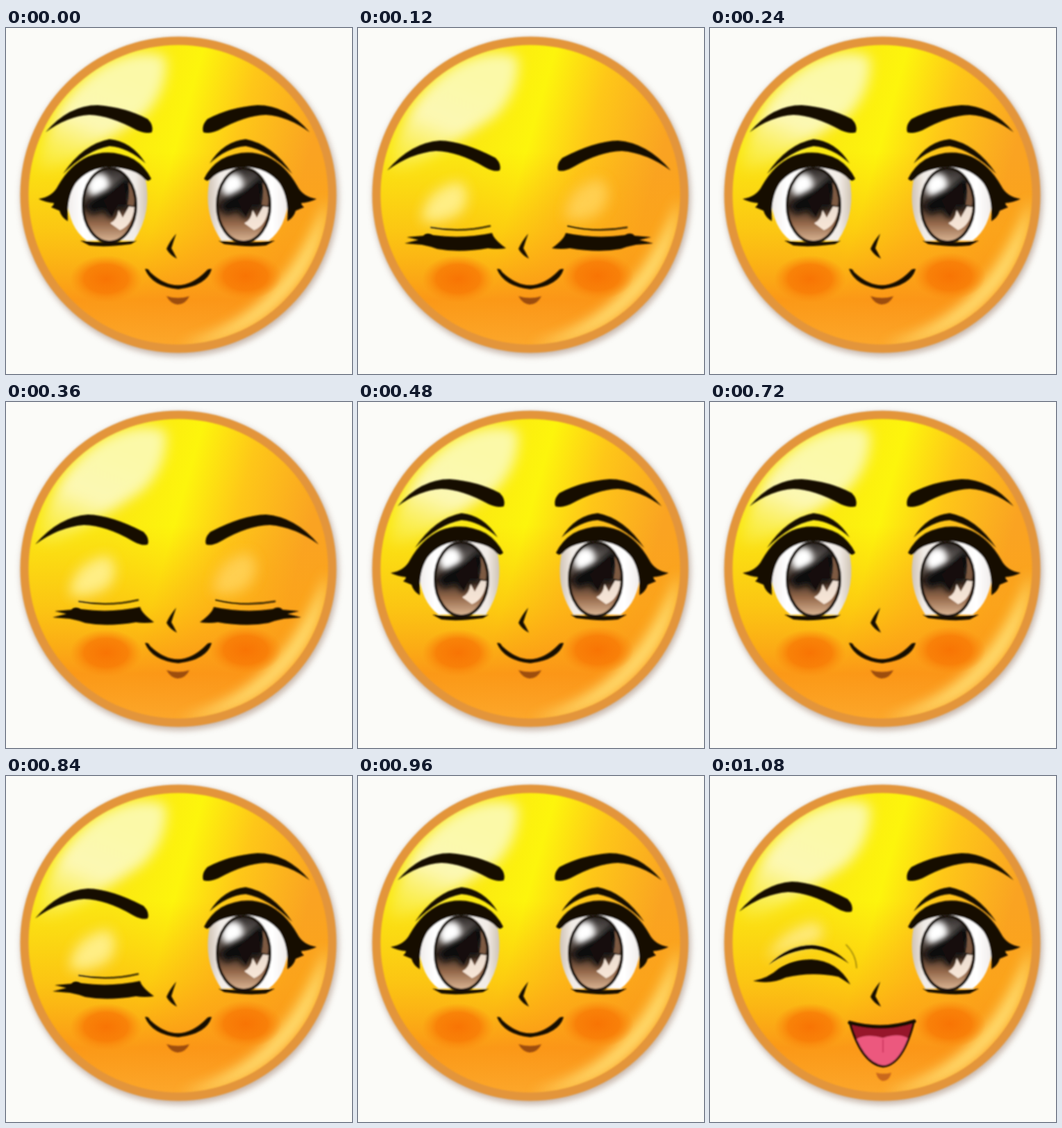
These frames come from a looping animation (498x498 px, 1200 ms). An HTML page:

```html
<!DOCTYPE html>
<html lang="en">
<head>
<meta charset="utf-8">
<title>Winking face</title>
<style>
html, body { margin: 0; width: 100%; height: 100%; overflow: hidden; background: #fbfbf8; }
svg { display: block; width: 100vw; height: 100vh; }
.ink { fill: #140b06; }
.line { fill: none; stroke: #140b06; stroke-linecap: round; }
</style>
</head>
<body>
<svg viewBox="0 0 498 498">
<defs>
  <linearGradient id="skin" gradientUnits="userSpaceOnUse" x1="165" y1="150" x2="425" y2="225">
    <stop offset="0" stop-color="#fbe812"/><stop offset=".3" stop-color="#fdf50c"/>
    <stop offset=".6" stop-color="#fec718"/><stop offset="1" stop-color="#faa322"/>
  </linearGradient>
  <linearGradient id="low" x2="0" y2="1">
    <stop offset=".36" stop-color="#fca414" stop-opacity="0"/>
    <stop offset=".62" stop-color="#fca414" stop-opacity=".5"/>
    <stop offset=".84" stop-color="#fb9417" stop-opacity=".95"/>
    <stop offset="1" stop-color="#fca82c"/>
  </linearGradient>
  <linearGradient id="shine" gradientUnits="userSpaceOnUse" x1="150" y1="65" x2="80" y2="225">
    <stop offset="0" stop-color="#fbf9a8"/><stop offset=".45" stop-color="#fcf8b4"/>
    <stop offset="1" stop-color="#f9ef60" stop-opacity=".2"/>
  </linearGradient>
  <radialGradient id="blush">
    <stop offset="0" stop-color="#f87404"/><stop offset=".6" stop-color="#f87b06" stop-opacity=".85"/>
    <stop offset="1" stop-color="#fa8a0e" stop-opacity="0"/>
  </radialGradient>
  <linearGradient id="iris" x2="0" y2="1">
    <stop offset="0" stop-color="#2c2725"/><stop offset=".25" stop-color="#6f6966"/>
    <stop offset=".52" stop-color="#3d2d24"/><stop offset=".75" stop-color="#94684a"/>
    <stop offset="1" stop-color="#dcb796"/>
  </linearGradient>
  <linearGradient id="white">
    <stop offset="0" stop-color="#efebe9"/><stop offset=".2" stop-color="#fff"/>
    <stop offset=".85" stop-color="#f1ebe6"/><stop offset="1" stop-color="#cfc3b4"/>
  </linearGradient>
  <filter id="crisp"><feGaussianBlur stdDeviation="1"/></filter>
  <filter id="soft" x="-50%" y="-50%" width="200%" height="200%"><feGaussianBlur stdDeviation="4"/></filter>
  <filter id="wide" x="-50%" y="-50%" width="200%" height="200%"><feGaussianBlur stdDeviation="9"/></filter>
  <clipPath id="disc"><circle cx="248" cy="240" r="221"/></clipPath>
  <clipPath id="irisClip"><ellipse cx="149" cy="255" rx="37" ry="52"/></clipPath>
  <clipPath id="mouthClip"><path d="M201 354Q248 370 294 352Q278 416 249 418Q218 414 201 354Z"/></clipPath>

  <path id="browUp" class="ink" d="M57 150Q90 111 132 111Q172 114 204 131Q213 140 210 150Q202 153 188 147Q150 126 120 125Q88 127 57 150Z"/>
  <path id="browDown" class="ink" d="M42 205Q76 165 118 162Q152 163 198 187Q207 196 204 205Q196 208 182 200Q145 178 112 177Q76 180 42 205Z"/>

  <g id="ball">
    <ellipse cx="149" cy="255" rx="38" ry="53" fill="url(#iris)"/>
    <g clip-path="url(#irisClip)">
      <ellipse cx="133" cy="226" rx="15" ry="17" fill="#fff" filter="url(#soft)" transform="rotate(25 133 226)"/>
      <path d="M114 256Q130 238 150 233Q166 218 177 212L184 230Q174 246 173 262L160 257L153 276L140 262L124 268Z" fill="#100b09" filter="url(#soft)"/>
      <path d="M140 248L170 222L174 254L161 254L152 272Z" fill="#120d0b"/>
      <path d="M150 281Q160 277 162 262L168 273L177 257L185 258Q182 284 164 291Z" fill="#fff1e4" opacity=".9"/>
      <path d="M176 222Q190 238 183 256L175 254Q179 238 176 222Z" fill="#7d5a43"/>
    </g>
    <ellipse cx="149" cy="255" rx="38" ry="53" fill="none" stroke="#1c1310" stroke-width="4"/>
  </g>
  <path id="sclera" fill="url(#white)" d="M87 244Q95 203 142 189Q186 187 200 213Q212 265 184 306H116Q91 288 87 244Z"/>
  <g id="lashes" class="ink">
    <path d="M47 246Q67 243 75 227Q92 197 118 185Q150 172 184 189Q200 199 209 217Q204 223 198 216Q186 203 151 200Q118 201 100 224Q87 244 89 278Q80 273 77 263L65 258Q69 255 69 252Q57 251 47 246Z"/>
    <path d="M82 210Q111 167 149 160Q181 163 201 195Q176 172 149 170Q116 176 82 210Z"/>
    <path d="M107 306Q148 311 188 306L180 311Q145 316 120 313Z"/>
  </g>
  <g id="shut">
    <path class="ink" d="M67 310L87 305L70 301L94 299Q99 293 108 298Q150 304 193 295Q195 304 213 317Q199 319 187 317Q146 324 114 318Q103 314 92 312Z"/>
    <path class="line" d="M105 287Q148 295 190 285" stroke-width="2.4" opacity=".85"/>
  </g>
</defs>

<circle cx="250" cy="244" r="229" fill="#b9a498" opacity=".75" filter="url(#soft)"/>
<circle cx="248" cy="240" r="222" fill="url(#skin)"/>
<g clip-path="url(#disc)">
  <circle cx="248" cy="240" r="222" fill="url(#low)"/>
  <path d="M45 200Q66 98 142 52Q196 26 230 42Q234 92 196 128Q140 165 85 195Q58 210 45 200Z" fill="url(#shine)" filter="url(#wide)"/>
  <path d="M462 245A214 214 0 0 1 250 456Q395 418 462 245Z" fill="#ffe67c" opacity=".9" filter="url(#wide)"/>
</g>
<circle cx="248" cy="240" r="221.5" fill="none" stroke="#e3953a" stroke-width="12" filter="url(#crisp)"/>
<ellipse cx="144" cy="361" rx="52" ry="34" fill="url(#blush)"/>
<ellipse cx="345" cy="357" rx="52" ry="34" fill="url(#blush)"/>

<g filter="url(#crisp)">
  <g data-on="L-open">
    <use href="#browUp"/><use href="#sclera"/><use href="#ball"/><use href="#lashes"/>
  </g>
  <g data-on="R-open">
    <g transform="matrix(-1 0 0 1 494 0)"><use href="#browUp"/><use href="#sclera"/></g>
    <use href="#ball" x="193"/>
    <use href="#lashes" transform="matrix(-1 0 0 1 494 0)"/>
  </g>
  <g data-on="L-shut">
    <path d="M92 278Q94 233 145 221Q166 234 150 264Q122 284 92 278Z" fill="#fff39a" opacity=".85" filter="url(#wide)"/>
    <use href="#browDown"/><use href="#shut"/>
  </g>
  <g data-on="R-shut">
    <path d="M298 274Q300 228 347 217Q372 235 348 266Q324 282 298 274Z" fill="#ffd55e" opacity=".8" filter="url(#wide)"/>
    <g transform="matrix(-1 0 0 1 492 0)"><use href="#browDown"/><use href="#shut"/></g>
  </g>
  <g data-on="L-happy">
    <path d="M82 264Q100 222 150 210Q174 222 154 238Q112 248 82 264Z" fill="#fff0a0" opacity=".75" filter="url(#wide)"/>
    <use href="#browDown" y="-10"/>
    <path class="ink" d="M62 295Q84 291 99 277Q119 264 146 264Q184 266 202 300Q193 294 185 289Q147 281 109 290Q89 300 62 295Z"/>
    <path class="ink" d="M84 272Q112 243 147 243Q178 246 200 270Q174 251 146 249Q114 251 84 272Z"/>
    <path class="line" d="M196 243Q210 257 211 276" stroke-width="2" opacity=".3"/>
  </g>

  <path class="ink" d="M245 296Q241 307 238 317Q242 324 246 332Q236 327 231 318Q235 308 245 296Z"/>
  <g data-on="M-smile">
    <path class="ink" d="M200 347Q205 346 207 351Q248 390 288 350Q291 346 296 347Q289 371 248 376Q210 372 200 347Z"/>
    <path d="M231 386Q248 391 264 386Q258 398 247 398Q237 397 231 386Z" fill="#9d4d10"/>
  </g>
  <g data-on="M-laugh">
    <path d="M201 354Q248 370 294 352Q278 416 249 418Q218 414 201 354Z" fill="#97152b"/>
    <path d="M210 379Q225 370 249 377Q272 369 286 378Q275 418 249 418Q222 412 210 379Z" fill="#ec587e" clip-path="url(#mouthClip)"/>
    <path d="M249 379V398" fill="none" stroke="#cf3660" stroke-width="2"/>
    <path class="line" d="M201 354Q218 414 249 418Q278 416 294 352" stroke-width="3"/>
    <path class="line" d="M201 355Q248 368 294 353" stroke-width="5"/>
    <path d="M239 427Q250 430 261 427Q258 439 249 439Q241 437 239 427Z" fill="#c9671c"/>
  </g>
</g>
</svg>
<script>
const STEP = 120;
const open = "L-open R-open M-smile";
const blink = "L-shut R-shut M-smile";
const wink = "L-shut R-open M-smile";
const laugh = "L-happy R-open M-laugh";
const poses = [open, blink, open, blink, open, wink, open, wink, open, laugh];
const parts = document.querySelectorAll("[data-on]");
const start = performance.now();

function draw(now) {
  const step = Math.floor(Math.max(0, now - start) / STEP) % poses.length;
  const shown = poses[step].split(" ");
  for (const part of parts) part.style.display = shown.includes(part.dataset.on) ? "" : "none";
  requestAnimationFrame(draw);
}
draw(start);
</script>
</body>
</html>
```
